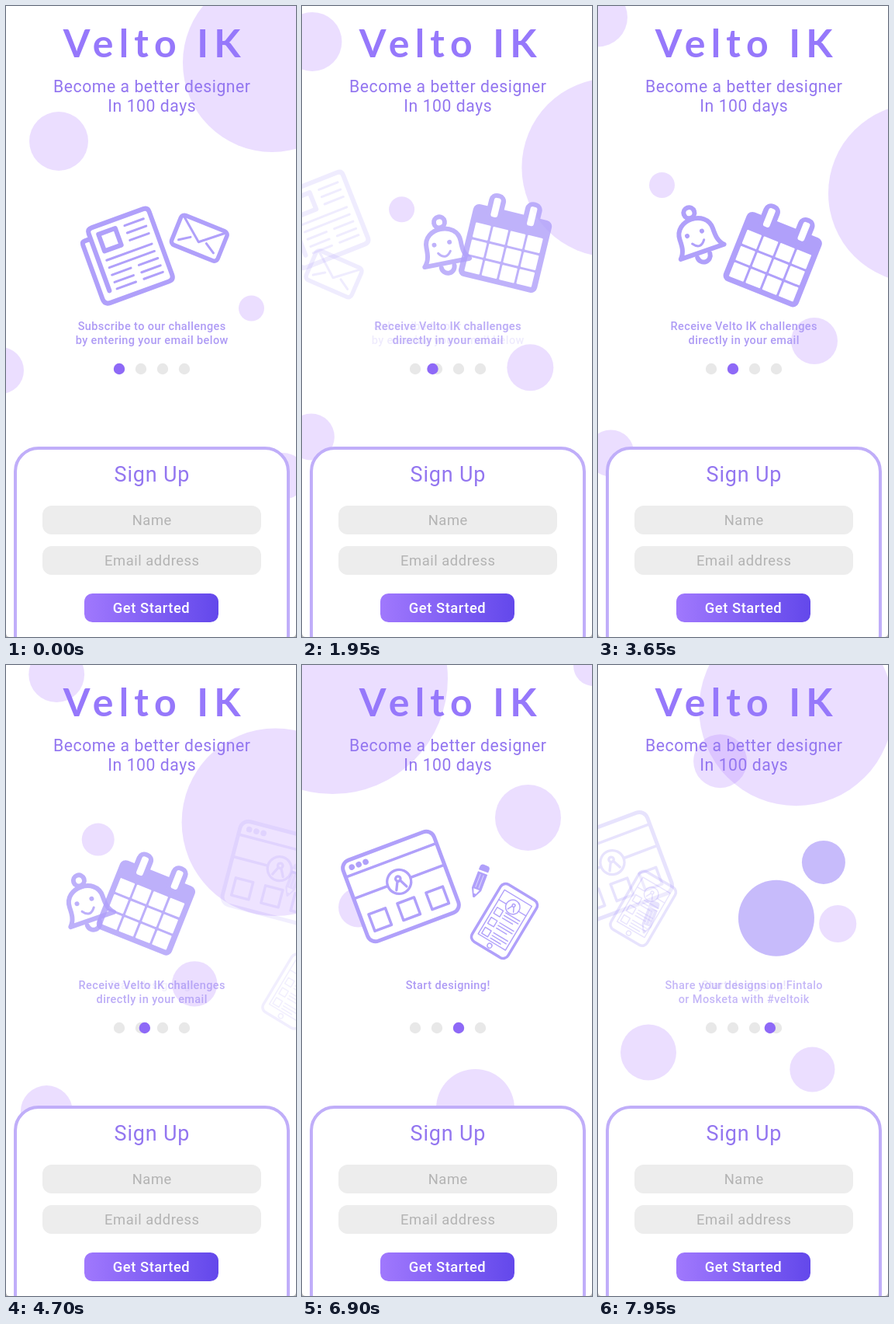
Write an HTML page that moves like this. It is 374 by 812 pixels and loops after 8 s.

```html
<!DOCTYPE html>
<html lang="en">
<head>
<meta charset="utf-8">
<title>Sign up onboarding</title>
<style>
  html, body { margin: 0; width: 100%; height: 100%; overflow: hidden; background: #fff; }
  svg { display: block; width: 100vw; height: 100vh; }
  text { font-family: Roboto, sans-serif; text-anchor: middle; }
  .title { font: 700 50px Lato, sans-serif; letter-spacing: 7.2px; fill: #9678fb; }
  .lead { font-size: 21.2px; letter-spacing: .55px; fill: #9376f0; }
  .caption { font-size: 14.5px; font-weight: 500; letter-spacing: .4px; fill: #ae9bf5; }
  .heading { font-size: 27px; letter-spacing: .8px; fill: #9376f0; }
  .field { font-size: 18.4px; letter-spacing: .54px; fill: #b3b3b3; }
  .action { font-size: 18.4px; font-weight: 500; letter-spacing: .54px; fill: #fff; }
  .line { fill: none; stroke: #b0a0fa; stroke-linecap: round; stroke-linejoin: round; }
  .solid { fill: #b0a0fa; }
  .paper { fill: #fff; }
</style>
</head>
<body>
<svg viewBox="0 0 374 812" preserveAspectRatio="none">
  <defs>
    <linearGradient id="violet">
      <stop offset="0" stop-color="#a078fd"/>
      <stop offset="1" stop-color="#6348eb"/>
    </linearGradient>
    <g id="person">
      <circle r="15.5"/>
      <circle cy="-4" r="3.2"/>
      <path d="M-7 9L-2.5 0M7 9L2.5 0"/>
    </g>
  </defs>

  <g id="bubbles" fill="#a76fff" fill-opacity=".23"></g>

  <g id="newspaper" class="line" stroke-width="6">
    <path d="M-40 35V-43q0-6 6-6H37q6 0 6 6V43q0 7-7 7H-44q-8 0-8-8V-32q0-4 4-4h8"/>
    <rect x="-28.5" y="-38" width="23" height="23"/>
    <path stroke-width="3" d="M7-37H33M7-27H33M7-17H33M-30-3H32M-30 7H32M-30 17H-4M-30 27H-4M-30 36H-4M7 17H33M7 27H33M7 36H33"/>
  </g>

  <g id="mail" class="line" stroke-width="5.5">
    <rect x="-32" y="-20.5" width="64" height="41" rx="5"/>
    <path stroke-width="3" d="M-28-18L1 5L28-18M-24 12L-11 3M11 3L24 11"/>
  </g>

  <g id="calendar">
    <rect class="solid" x="-52" y="-47" width="104" height="95.5" rx="8"/>
    <g id="cells" class="paper"></g>
    <g class="solid">
      <rect x="-35" y="-66" width="22" height="36" rx="10"/>
      <rect x="13" y="-66" width="22" height="36" rx="10"/>
    </g>
    <g class="paper">
      <rect x="-28.5" y="-60" width="9" height="25" rx="3"/>
      <rect x="19.5" y="-60" width="9" height="25" rx="3"/>
    </g>
  </g>

  <g id="bell" class="line" stroke-width="6">
    <circle cy="-31" r="7"/>
    <path d="M-29.500 22C-22.500 15-22.500 6-22.500-2C-22.500-29 22.500-29 22.500-2C22.500 6 22.500 15 29.500 22Z"/>
    <path d="M-8.500 27a8.500 8.500 0 0 0 17 0"/>
    <path d="M-12-3.500h.01M8-3.500h.01"/>
    <path stroke-width="3" d="M-9 8Q-1 19 7 8"/>
  </g>

  <g id="browser" class="line" stroke-width="5">
    <rect class="paper" x="-62.500" y="-55.500" width="125" height="111" rx="11"/>
    <path stroke-width="3.500" d="M-61-36H61M-61-6.500H-16M16-6.500H61"/>
    <path stroke-width="7.600" d="M-50.500-45.500h.01M-41-45.500h.01M-31.500-45.500h.01"/>
    <use href="#person" y="-6.500" stroke-width="3.300"/>
    <path stroke-width="3.500" d="M-51.500 19h23v23h-23zM-12 19h23v23h-23zM27.500 19h23v23h-23z"/>
  </g>

  <g id="phone" class="line" stroke-width="3.500">
    <rect class="paper" x="-27" y="-43" width="54" height="86" rx="7.500"/>
    <g stroke-width="1.400">
      <rect x="-20.500" y="-34.500" width="41" height="66"/>
      <circle cy="37" r="3"/>
      <use href="#person" transform="translate(0 -21) scale(.6)" stroke-width="2.400"/>
      <path d="M-20.500-20H-9M9-20H20.500"/>
      <path id="rows"/>
    </g>
  </g>

  <g id="pencil">
    <path class="solid" d="M-6.500-14v-4q0-4 4-4h5q4 0 4 4v4zM-6.500-11.500h13V11L1 22h-2L-6.500 11z"/>
    <path class="paper" d="M-4 11h8L1.500 17h-3z"/>
    <path d="M-2.200-9V9M2.200-9V9" stroke="#fff" stroke-width="1" opacity=".6"/>
  </g>

  <circle id="ball" class="solid" r="49"/>
  <circle id="badge" class="solid" r="28"/>

  <text class="title" x="191.800" y="66">Velto IK</text>
  <text class="lead" x="188.300" y="111">Become a better designer</text>
  <text class="lead" x="188.300" y="136">In 100 days</text>
  <g id="captions"></g>

  <g id="dots" fill="#e8e8e8"></g>
  <circle id="marker" cy="467" r="7.200" fill="#8e69f7"/>

  <rect x="12" y="569" width="352" height="270" rx="30" fill="#fff" stroke="#c0aef9" stroke-width="4"/>
  <text class="heading" x="188.400" y="612">Sign Up</text>
  <g fill="#ededed">
    <rect x="47" y="643" width="282" height="37" rx="12"/>
    <rect x="47" y="695" width="282" height="37" rx="12"/>
  </g>
  <text class="field" x="188.300" y="668">Name</text>
  <text class="field" x="188.300" y="720">Email address</text>
  <rect x="101" y="756" width="173" height="37" rx="10.500" fill="url(#violet)"/>
  <text class="action" x="187.500" y="781">Get Started</text>
  <path fill="#bbb" d="M0 807Q0 812 5 812H0zM374 807Q374 812 369 812H374z"/>
</svg>

<script>
const LOOP = 8000, SLIDE = 800;
const slideStarts = [1397, 4470, 7450];

// Per bubble: [x, y, radius] on each of the four pages.
const bubbles = [
  [[343, 73, 115], [412, 241, 115], [39.5, 17.5, 148.5], [344, 72, 115.5]],
  [[68, 174, 38], [0, 14.5, 38], [376, 1, 26], [68, 174, 38]],
  [[316.5, 389, 16.5], [82.5, 230.5, 16.5], [291.5, 196.5, 42.5], [316.5, 389, 16.5]],
  [[-7, 469, 30], [16.5, 575.5, 30], [223.5, 570.5, 50.5], [0, 469, 30]],
  [[357, 605, 30], [279, 431, 30], [72.5, 312, 25.5], [360, 606, 30.5]]
];

// Each pose is [x, y, rotation]: before, on and after the item's own page.
const items = [
  { id: "newspaper", page: 0, on: [159, 319.8, -20], after: [-3, 262, -22] },
  { id: "mail", page: 0, on: [249.3, 298.7, 22], after: [-10, 356, 24] },
  { id: "calendar", page: 1, before: [412, 253, -19.7], on: [225.5, 325.5, 21.8], after: [-33, 246, 21.8] },
  { id: "bell", page: 1, before: [409, 363, 21], on: [127.5, 295.5, -19], after: [-8, 360, -19] },
  { id: "browser", page: 2, before: [398, 265, 22], on: [127.5, 285, -20.5], after: [-23, 250, -20.5] },
  { id: "phone", page: 2, before: [397, 439, 31], on: [261, 329.5, 31], after: [-25, 306.5, 30] },
  { id: "pencil", page: 2, before: [400, 277, 21], on: [229, 278.3, 21], after: [0, 344, 21] },
  { id: "ball", page: 3, before: [420, 345, 0], on: [152, 318, 0] },
  { id: "badge", page: 3, before: [420, 200, 0], on: [238, 276, 0] }
];

const captions = [
  ["Subscribe to our challenges", "by entering your email below"],
  ["Receive Velto IK challenges", "directly in your email"],
  ["Start designing!"],
  ["Share your designs on Fintalo", "or Mosketa with #veltoik"]
];

const byId = id => document.getElementById(id);

function add(parent, tag, attrs) {
  const node = document.createElementNS("http://www.w3.org/2000/svg", tag);
  setAttrs(node, attrs);
  return parent.appendChild(node);
}

function setAttrs(node, attrs) {
  for (const name in attrs) node.setAttribute(name, attrs[name]);
}

const mix = (a, b, p) => a.map((v, i) => v + (b[i] - v) * p);

// cubic-bezier(.42, 0, .58, 1)
function easeInOut(x) {
  if (x <= 0) return 0;
  if (x >= 1) return 1;
  let low = 0, high = 1, u = .5;
  for (let i = 0; i < 20; i++) {
    const v = 1 - u;
    if (1.26 * u * v * v + 1.74 * u * u * v + u ** 3 < x) low = u; else high = u;
    u = (low + high) / 2;
  }
  return u * u * (3 - 2 * u);
}

for (let row = 0; row < 3; row++)
  for (let col = 0; col < 4; col++)
    add(byId("cells"), "rect", { x: -44.5 + col * 23, y: -23 + row * 22.5, width: 20, height: 19.5, rx: 1 });

byId("rows").setAttribute("d", [-6, 9, 24].map(y =>
  `M-17 ${y - 4.5}h9v9h-9zM-4 ${y - 4}H17M-4 ${y}H17M-4 ${y + 4}H11`).join(""));

for (let i = 0; i < 4; i++) add(byId("dots"), "circle", { cx: 146 + i * 28, cy: 467, r: 7.2 });

const bubbleNodes = bubbles.map(() => add(byId("bubbles"), "circle", {}));

const captionNodes = captions.map(lines => {
  const group = add(byId("captions"), "g", {});
  lines.forEach((line, i) => {
    add(group, "text", { class: "caption", x: 188.2, y: 417 + i * 18 }).textContent = line;
  });
  return group;
});

items.forEach(item => { item.node = byId(item.id); });

const presence = (page, progress) => Math.max(0, 1 - Math.abs(progress - page));

function draw(now) {
  const t = now % LOOP;
  const progress = slideStarts.reduce((sum, start) => sum + easeInOut((t - start) / SLIDE), 0);
  const page = Math.min(2, Math.floor(progress));

  bubbles.forEach((stops, i) => {
    const [cx, cy, r] = mix(stops[page], stops[page + 1], progress - page);
    setAttrs(bubbleNodes[i], { cx, cy, r });
  });

  items.forEach(item => {
    const offset = Math.max(-1, Math.min(1, progress - item.page));
    const goal = (offset < 0 ? item.before : item.after) || item.on;
    const [x, y, angle] = mix(item.on, goal, Math.abs(offset));
    setAttrs(item.node, {
      transform: `translate(${x} ${y}) rotate(${angle})`,
      opacity: presence(item.page, progress)
    });
  });

  captionNodes.forEach((node, i) => node.setAttribute("opacity", presence(i, progress)));
  byId("marker").setAttribute("cx", 146 + progress * 28);
  requestAnimationFrame(draw);
}

draw(0);
</script>
</body>
</html>
```
